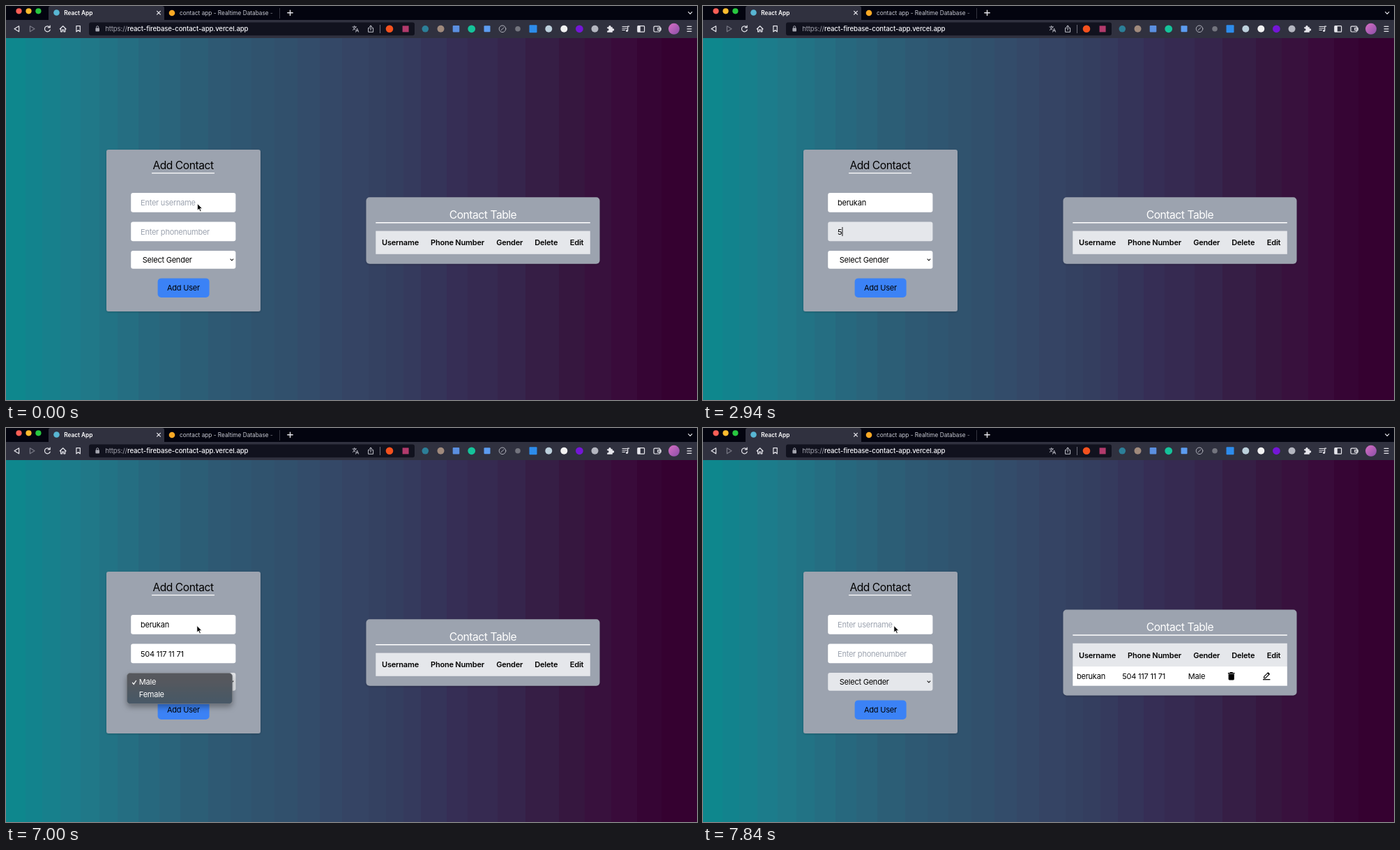
Animation, 991 px wide and 565 px high, one loop 8 s. Source, as an HTML page:

```html
<!DOCTYPE html>
<html lang="en">
<head>
<meta charset="utf-8">
<title>React App</title>
<style>
html, body { margin: 0; width: 100%; height: 100%; overflow: hidden; background: #2f5670; }
svg { display: block; font: 11px Inter, sans-serif; }
text { white-space: pre; }
.body { letter-spacing: -.23px; }
.title { font-size: 15.6px; letter-spacing: -.45px; }
.head { font-weight: 600; letter-spacing: -.2px; }
.ui { font-size: 8.26px; }
.url { font-size: 9.6px; letter-spacing: -.1px; }
.line { fill: none; stroke: #e6e6ec; stroke-width: 1.2; stroke-linecap: round; stroke-linejoin: round; }
</style>
</head>
<body>
<svg id="stage" width="991" height="565" viewBox="0 0 991 565">
  <defs>
    <linearGradient id="menuFill" x2="0" y2="1">
      <stop offset=".2" stop-color="#56585d"/><stop offset="1" stop-color="#475867"/>
    </linearGradient>
    <linearGradient id="avatar" x2="1" y2="1">
      <stop offset="0" stop-color="#d86fc4"/><stop offset="1" stop-color="#8a4fa8"/>
    </linearGradient>
    <linearGradient id="tabFade">
      <stop offset="0" stop-color="#03040f" stop-opacity="0"/><stop offset="1" stop-color="#03040f"/>
    </linearGradient>
    <filter id="soft" x="-10%" y="-10%" width="120%" height="120%">
      <feDropShadow dx="0" dy="1" stdDeviation="1.5" flood-opacity=".2"/>
    </filter>
    <filter id="deep" x="-20%" y="-50%" width="140%" height="200%">
      <feDropShadow dx="0" dy="4" stdDeviation="4" flood-opacity=".35"/>
    </filter>
  </defs>

  <g id="bands" shape-rendering="crispEdges"></g>

  <g id="tabs">
    <rect width="991" height="21" fill="#03040f"/>
    <path d="M61 21V3q0-3 3-3H224q3 0 3 3V21z" fill="#30313f"/>
    <circle cx="18.5" cy="7.3" r="4.1" fill="#fe5f57"/>
    <circle cx="32.5" cy="7.3" r="4.1" fill="#febc2e"/>
    <circle cx="46.4" cy="7.3" r="4.1" fill="#28c840"/>
    <circle cx="72.5" cy="9.5" r="4.3" fill="#58b6d3"/>
    <text class="ui" x="83.3" y="12.7" fill="#fff" font-weight="600">React App</text>
    <path class="line" d="M216.6 7.4l4.8 4.8m0-4.8l-4.8 4.8"/>
    <circle cx="238" cy="10" r="4.3" fill="#f9a825"/>
    <text class="ui" x="249" y="12.7" fill="#c9cad2">contact app - Realtime Database - </text>
    <rect x="376" y="2" width="14" height="17" fill="url(#tabFade)"/>
    <path d="M392.5 3V18" stroke="#33343f"/>
    <path class="line" d="M403.8 9.8h7.4m-3.7-3.7v7.4" style="stroke-width:1.4"/>
    <path class="line" d="M978.6 8.7l2.6 2.6 2.6-2.6"/>
  </g>

  <g id="toolbar">
    <rect y="20" width="991" height="26" fill="#30313f"/>
    <rect x="119" y="23.5" width="467" height="18.7" rx="3" fill="#11121e"/>
    <path class="line" d="M18.6 28.8v8L12 32.8z"/>
    <path class="line" d="M34.4 28.8v8L41 32.8z" style="stroke:#777884"/>
    <path class="line" d="M62.6 30.3A4 4 0 1 0 63.3 34M63.2 28v2.9h-2.9"/>
    <path class="line" d="M77.3 33l4.4-4.2L86 33M78.6 32.2v4.6h2v-2.6h2.2v2.6h2v-4.6"/>
    <path class="line" d="M100.9 28.6h5.4v8.3l-2.7-2.2-2.7 2.2z"/>
    <rect x="128.4" y="31.6" width="5.6" height="5" rx=".8" fill="#a5a6b0"/>
    <path class="line" d="M129.7 31.5v-1.3a1.5 1.5 0 0 1 3 0v1.3" style="stroke:#a5a6b0;stroke-width:1"/>
    <text class="url" x="142.2" y="36.2" fill="#a0a1ac">https://<tspan fill="#f4f4f8" font-weight="500">react-firebase-contact-app.vercel.app</tspan></text>
    <path class="line" d="M497 30h5.4m-2.7-1.5V30m2 0q-1 3-4.4 4.6m1-3.2q1 2 2.6 2.8M501.6 37.2l2-5 2 5m-3.3-1.6h2.6" style="stroke-width:.9;stroke:#c4c5ce"/>
    <path class="line" d="M521.2 31.5h-1.6v5.8h7v-5.8H525M523.1 34.6v-6.4m-2 1.8l2-2 2 2" style="stroke-width:1;stroke:#c4c5ce"/>
    <path d="M536.5 27V39" stroke="#6d6e7a"/>
    <circle cx="550" cy="32.8" r="5.3" fill="#f4511e"/>
    <rect x="568.6" y="28.4" width="9" height="9" fill="#b23a6c"/>
  </g>
  <g id="extensions"></g>
  <g id="tools">
    <circle cx="712" cy="32.8" r="4.8" class="line" style="stroke:#aeb0ba;stroke-width:1"/>
    <path class="line" d="M710 34.8l4-4" style="stroke:#aeb0ba;stroke-width:1"/>
    <path d="M862.2 30.2h2.2a1.7 1.7 0 1 1 3.2 0h2.2v2.3a1.7 1.7 0 1 1 0 3.1v2.2h-7.6v-2.4a1.6 1.6 0 1 0 0-2.9z" fill="#e6e6ec"/>
    <path class="line" d="M884 29.5h6.5M884 32h6.5M884 34.5h3.6M891.7 35.3v-6.2h2"/>
    <circle cx="890.5" cy="35.5" r="1.5" fill="#e6e6ec"/>
    <rect class="line" x="905.8" y="28.6" width="9.8" height="8.6" rx="1"/>
    <rect x="906" y="28.8" width="3.8" height="8.2" fill="#e6e6ec"/>
    <rect class="line" x="929" y="29.2" width="9" height="7.8" rx="1.4"/>
    <path class="line" d="M939.2 31.6h-4.4v3h4.4z"/>
    <circle cx="958" cy="32.8" r="8" fill="url(#avatar)"/>
    <path class="line" d="M977 29.3h6M977 32.8h6M977 36.3h6"/>
  </g>

  <g id="form" class="body">
    <rect x="144" y="206" width="221" height="232" rx="3" fill="#9ca3af" filter="url(#soft)"/>
    <text class="title" x="254" y="234" text-anchor="middle">Add Contact</text>
    <path d="M209 239.6h90" stroke="#fff" stroke-width="1.4"/>
    <rect id="nameBox" x="179.2" y="268" width="150.2" height="27.7" rx="3"/>
    <text id="name" x="193" y="286"/>
    <rect id="phoneBox" x="179.2" y="309.4" width="150.2" height="27.8" rx="3"/>
    <text id="phone" x="193" y="327.5"/>
    <rect id="caret" width=".9" height="13"/>
    <rect id="selectBox" x="179.2" y="351" width="150.2" height="25.7" rx="3"/>
    <text id="gender" x="195.8" y="368"/>
    <path d="M321.6 362.7l2.3 2.3 2.3-2.3" fill="none" stroke="#222" stroke-width="1.1"/>
    <rect x="217.6" y="390.4" width="74" height="27.6" rx="5" fill="#3b82f6"/>
    <text x="254.4" y="408.3" text-anchor="middle">Add User</text>
  </g>

  <g id="table">
    <rect id="card" x="516.5" y="274.3" width="335" rx="5" fill="#9ca3af" filter="url(#soft)"/>
    <text class="title" x="684" y="305" text-anchor="middle" fill="#fff">Contact Table</text>
    <path d="M530.3 310.8H837.8" stroke="#fff" stroke-width="1.4"/>
    <rect x="530.3" y="322.6" width="307.5" height="33.2" fill="#e5e7eb"/>
    <g id="heads" class="head"></g>
    <g id="row" class="body">
      <rect x="530.3" y="355.8" width="307.5" height="27.7" fill="#fff"/>
      <text id="cellName" x="536" y="373.8"/>
      <text id="cellPhone" x="601.3" y="373.8"/>
      <text x="695.8" y="373.8">Male</text>
      <path d="M752.9 364.8h2.4l.9-1h3l.9 1h2.4v1.4h-9.6zM753.6 366.9h8.2v7q0 1.3-1.3 1.3h-5.6q-1.3 0-1.3-1.3z"/>
      <path d="M803 374.5h10.4" stroke="#000" stroke-width="1.3"/>
      <path d="M804.6 372.4v-2l5.4-5.4 2 2-5.4 5.4z" fill="none" stroke="#000" stroke-width="1.1"/>
      <path d="M809.3 365.3l1.2-1.3 2.4 2.4-1.2 1.3z"/>
    </g>
  </g>

  <g id="menu" class="body" fill="#fff">
    <rect x="173.5" y="351.5" width="151" height="44" rx="4.5" fill="url(#menuFill)" stroke="#777b80" stroke-width=".8" filter="url(#deep)"/>
    <rect id="mark" x="177.5" y="355.3" width="143" height="18" rx="3" fill="#2a66cc"/>
    <path d="M181.2 365l2 2.4 3.6-5.4" fill="none" stroke="#fff" stroke-width="1.2"/>
    <text x="190.8" y="368.2">Male</text>
    <text x="190.8" y="386.2">Female</text>
  </g>

  <path id="arrow" d="M0 0v9.4l2.2-2 1.6 3.6 1.6-.7-1.6-3.5h3z" fill="#000" stroke="#fff" stroke-width=".7"/>
  <g id="beam" fill="none">
    <path d="M273 278.5q1.6 0 1.8 1.2 .2-1.2 1.8-1.2M274.8 279.5v9.2M273 289.7q1.6 0 1.8-1.2 .2 1.2 1.8 1.2" stroke="#111" stroke-width=".9"/>
  </g>
</svg>
<script>
const LOOP = 8000;
const USER = "berukan", PHONE = "504 117 11 71";
const userKeys = [840, 980, 1120, 1260, 1400, 1680, 1820];
const phoneKeys = [2940, 3360, 3570, 3780, 4130, 4270, 4480, 4690, 4830, 5040, 5180, 5390, 5530];
const $ = id => document.getElementById(id);
const set = (id, attrs) => { for (const k in attrs) $(id).setAttribute(k, attrs[k]); };
const show = (id, on) => set(id, { visibility: on ? "visible" : "hidden" });

// Background: colour stops [x, r, g, b] sampled once per vertical band
const stops = [[0, 11, 137, 142], [107, 31, 122, 138], [200, 39, 105, 127], [290, 46, 91, 116],
  [400, 49, 80, 108], [482, 53, 70, 102], [560, 52, 62, 95], [632, 54, 48, 87],
  [705, 54, 40, 79], [800, 54, 25, 64], [880, 57, 12, 59], [945, 53, 1, 48], [991, 52, 0, 48]];
const edges = [0, 28, 52, 78, 107, 134, 160, 190, 220, 250, 290, 322, 352, 385, 418, 450, 482, 520,
  545, 570, 595, 632, 662, 705, 745, 793, 830, 868, 905, 940, 991];
function shade(x) {
  const i = stops.findIndex(s => s[0] >= x), a = stops[i - 1], b = stops[i];
  const k = (x - a[0]) / (b[0] - a[0]);
  return `rgb(${[1, 2, 3].map(c => Math.round(a[c] + (b[c] - a[c]) * k))})`;
}
$("bands").innerHTML = edges.slice(1).map((end, i) =>
  `<rect x="${edges[i]}" y="46" width="${end - edges[i]}" height="519" fill="${shade((edges[i] + end) / 2)}"/>`).join("");

const dot = (x, c, r = 5) => `<circle cx="${x}" cy="32.8" r="${r}" fill="${c}"/>`;
const box = (x, c, s = 9.6) => `<rect x="${x - s / 2}" y="${32.8 - s / 2}" width="${s}" height="${s}" rx="1" fill="${c}"/>`;
$("extensions").innerHTML = dot(601.3, "#2c7f98", 4.8) + dot(623.5, "#a08a7c") + box(645.5, "#5b8fe0") +
  dot(667.7, "#15c39a", 5.4) + box(690, "#5c9cf0", 9) + dot(734, "#73757e", 3.8) + box(756, "#2d8ceb", 11) +
  dot(778.3, "#bcd0dc") + dot(800.3, "#f2f2f2") + dot(822.4, "#7416d6", 5.4) + dot(844.5, "#b4b6c0", 5);

$("heads").innerHTML = [[539, "Username"], [609, "Phone Number"], [703.2, "Gender"], [758.3, "Delete"], [808.8, "Edit"]]
  .map(([x, s]) => `<text x="${x}" y="343.4">${s}</text>`).join("");
$("cellName").textContent = USER;
$("cellPhone").textContent = PHONE;

function field(id, value, hint) {
  const el = $(id);
  el.textContent = value || hint;
  el.setAttribute("fill", value ? "#000" : "#9ca3af");
  return value ? 193 + el.getComputedTextLength() : 193;
}

function draw(t) {
  const sent = t >= 7840;
  const typed = (s, keys) => sent ? "" : s.slice(0, keys.filter(k => k <= t).length);
  const onName = t >= 280 && t < 2100, onPhone = t >= 2100 && t < 5950, onSelect = t >= 5950;
  const bg = on => ({ fill: on ? "#e5e7eb" : "#fff" });

  set("nameBox", bg(onName));
  set("phoneBox", bg(onPhone));
  set("selectBox", bg(onSelect));
  const nameEnd = field("name", typed(USER, userKeys), "Enter username");
  const phoneEnd = field("phone", typed(PHONE, phoneKeys), "Enter phonenumber");
  $("gender").textContent = t >= 7000 && !sent ? "Male" : "Select Gender";

  const blinkOff = t >= 2660 && t < 2940;
  show("caret", (onName || onPhone) && !blinkOff);
  set("caret", { x: (onName ? nameEnd : phoneEnd) + .2, y: onName ? 275.5 : 317 });

  // Popup: the chosen item blinks, then the menu fades out
  show("menu", t >= 6370 && t < 7420);
  set("menu", { opacity: Math.min(1, Math.max(0, 1 - (t - 7110) / 310)) });
  set("mark", { opacity: t >= 7000 && t < 7070 ? 0 : 1 });

  show("row", sent);
  set("card", { height: sent ? 123 : 95.4 });
  set("table", { transform: `translate(0 ${sent ? -13.8 : 0})` });

  show("arrow", t < 350 || t >= 6370);
  set("arrow", { transform: `translate(${t < 350 ? 274.6 : 273.9} 283.6)` });
  show("beam", t >= 350 && t < 840);
}

function tick(now) {
  draw(now % LOOP);
  requestAnimationFrame(tick);
}
draw(0);
requestAnimationFrame(tick);
</script>
</body>
</html>
```
